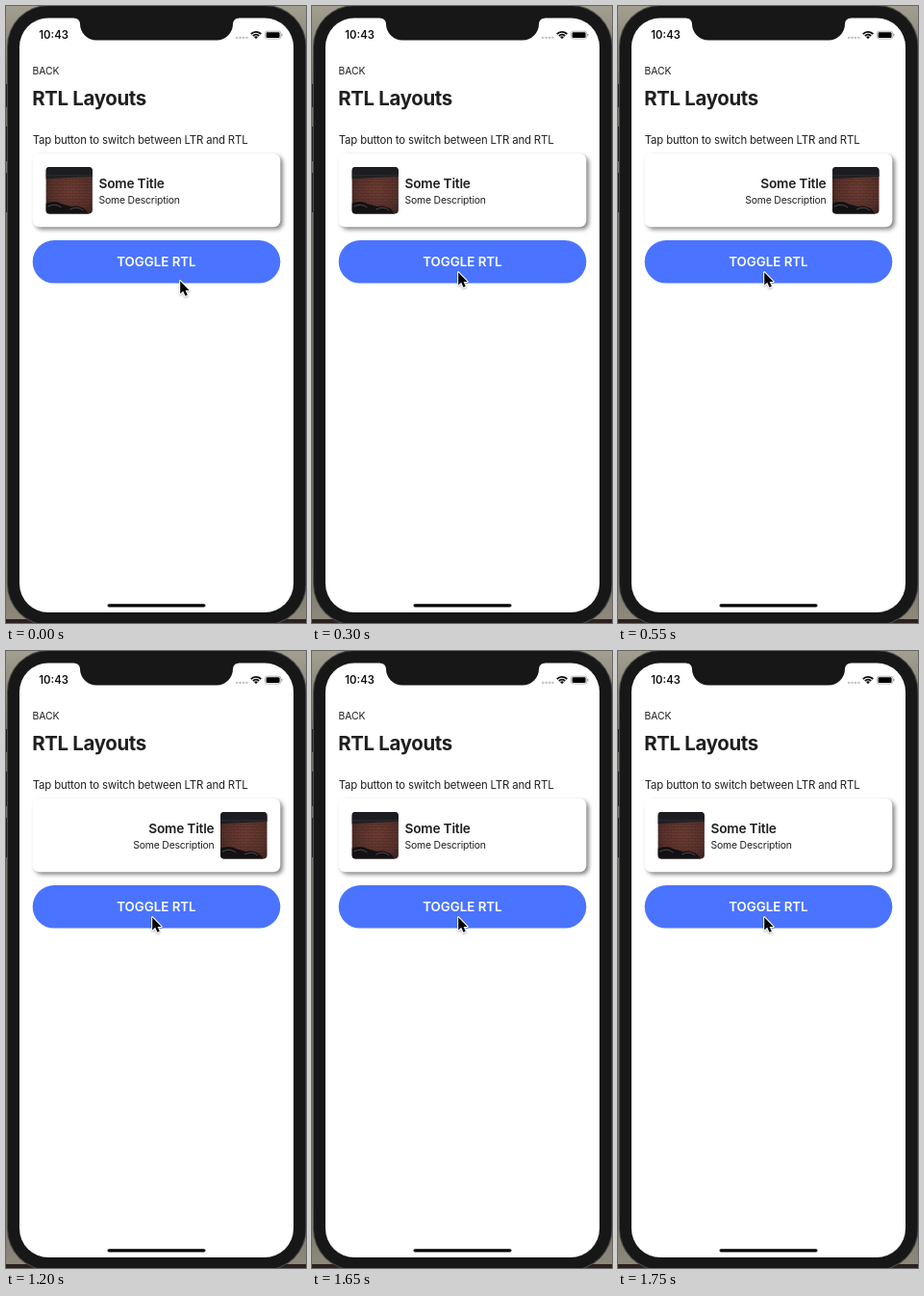
An HTML page with a canvas that plays this animation: 312x640 px, repeating every 1.9 s.

```html
<!DOCTYPE html>
<html lang="en">
<head>
<meta charset="utf-8">
<title>RTL Layouts</title>
<style>
html, body { margin: 0; width: 100%; height: 100%; overflow: hidden; background: #96917f; }
canvas { display: block; width: 312px; height: 640px; }
</style>
</head>
<body>
<canvas id="stage"></canvas>
<script>
const W = 312, H = 640, LOOP = 1900, STEP = 50;
const INK = '#1f1f21', BEZEL = '#171717';
const canvas = document.getElementById('stage');
const ctx = canvas.getContext('2d');
const dpr = window.devicePixelRatio || 1;
canvas.width = W * dpr;
canvas.height = H * dpr;

function box(x, y, w, h, r, fill) {
  ctx.beginPath();
  ctx.roundRect(x, y, w, h, r);
  ctx.fillStyle = fill;
  ctx.fill();
}

function shape(d, fill) {
  ctx.fillStyle = fill;
  ctx.fill(new Path2D(d));
}

function label(str, x, y, size, weight, spacing, align = 'left', fill = INK) {
  ctx.font = `${weight} ${size}px Inter, "Open Sans", sans-serif`;
  ctx.letterSpacing = spacing + 'px';
  ctx.textAlign = align;
  ctx.fillStyle = fill;
  ctx.fillText(str, x, y);
}

function device() {
  const bg = ctx.createLinearGradient(0, 0, 0, H);
  bg.addColorStop(0, '#a39f90');
  bg.addColorStop(0.12, '#77736a');
  bg.addColorStop(0.9, '#77736a');
  bg.addColorStop(1, '#8f8a7b');
  ctx.fillStyle = bg;
  ctx.fillRect(0, 0, W, H);
  box(0, 636, W, 4, 0, '#2b211f');
  for (const [y, h] of [[81, 24], [125, 36], [173, 41]]) box(0, y, 2, h, 0, '#222');
  // The body runs slightly past the stage on the right and at the bottom.
  box(1, -1, 311.5, 643.5, 43, '#4a4a4a');
  box(2, 0, 309.5, 641.5, 42, BEZEL);
  box(14, 12.5, 285, 616.5, 30, '#fff');
  shape('M71 12 V12.5 A6 6 0 0 1 77 18.5 A17 17 0 0 0 94 35.5 H219 A17 17 0 0 0 236 18.5 A6 6 0 0 1 242 12.5 V12 Z', BEZEL);
}

function statusBar() {
  label('10:43', 49.6, 34, 11.3, 600, 0, 'center', '#111');
  for (let i = 0; i < 4; i++) box(239 + i * 3.4, 31.7, 2.3, 2.2, 0.6, '#c4c4c4');
  ctx.strokeStyle = '#111';
  ctx.lineWidth = 1.8;
  for (const r of [4.3, 7.2]) {
    ctx.beginPath();
    ctx.arc(260, 34, r, -Math.PI * 0.76, -Math.PI * 0.24);
    ctx.stroke();
  }
  shape('M260 34.2 L258 32.1 Q260 30.5 262 32.1 Z', '#111');
  ctx.lineWidth = 0.7;
  ctx.strokeStyle = '#999';
  ctx.beginPath();
  ctx.roundRect(269.4, 26.2, 16.4, 7.8, 2.2);
  ctx.stroke();
  box(270.6, 27.3, 14, 5.6, 1.2, '#000');
  box(286.4, 28.8, 1, 2.6, 0.5, '#999');
}

function photo(x, y) {
  ctx.save();
  ctx.translate(x, y);
  ctx.beginPath();
  ctx.roundRect(0, 0, 48.5, 48.5, 4);
  ctx.clip();
  const wall = ctx.createRadialGradient(26, 24, 4, 26, 24, 34);
  wall.addColorStop(0, '#693a31');
  wall.addColorStop(0.6, '#56302a');
  wall.addColorStop(1, '#33201d');
  ctx.fillStyle = wall;
  ctx.fillRect(0, 0, 49, 49);
  ctx.fillStyle = 'rgba(28, 16, 15, 0.18)';
  for (let row = 0; row < 12; row++) {
    const top = 12 + row * 3;
    ctx.fillRect(0, top, 49, 0.7);
    for (let col = 0; col < 8; col++) ctx.fillRect(col * 7 + row % 2 * 3.5, top, 0.6, 3);
  }
  shape('M0 0 H49 V10 L0 12 Z', '#1b1d20');
  box(0, 8.5, 49, 0.8, 0, '#35353a');
  shape('M0 38 Q9 34 16 38 L26 41 Q35 39 41 44 L45 49 H0 Z', '#121113');
  ctx.strokeStyle = '#5e5657';
  ctx.lineWidth = 0.8;
  ctx.stroke(new Path2D('M2 41 Q10 37 16 42 M25 44 Q33 40 39 45'));
  ctx.restore();
}

function card(rtl) {
  ctx.save();
  ctx.shadowColor = 'rgba(0, 0, 0, 0.48)';
  ctx.shadowBlur = 4.5 * dpr;
  ctx.shadowOffsetX = ctx.shadowOffsetY = 2.6 * dpr;
  box(27.7, 153, 257.6, 76.2, 7, '#fff');
  ctx.restore();
  const x = rtl ? 216.5 : 96.5;
  const align = rtl ? 'right' : 'left';
  photo(rtl ? 223 : 41.4, 167);
  label('Some Title', x, 188.8, 13.7, 600, -0.2, align);
  label('Some Description', x, 205, 10.4, 400, -0.18, align);
}

function cursor(x, y) {
  ctx.save();
  ctx.translate(x, y);
  const arrow = new Path2D('M0 0 V13.2 L3 10.5 L5.3 15.6 L7.6 14.6 L5.4 9.7 H9.4 Z');
  ctx.shadowColor = 'rgba(0, 0, 0, 0.3)';
  ctx.shadowBlur = 2 * dpr;
  ctx.shadowOffsetY = dpr;
  ctx.strokeStyle = '#fff';
  ctx.lineWidth = 2.2;
  ctx.lineJoin = 'round';
  ctx.stroke(arrow);
  ctx.shadowColor = 'transparent';
  ctx.fillStyle = '#000';
  ctx.fill(arrow);
  ctx.restore();
}

function draw(t) {
  ctx.setTransform(dpr, 0, 0, dpr, 0, 0);
  device();
  statusBar();
  label('BACK', 27.5, 71.3, 10.4, 400, -0.1);
  label('RTL Layouts', 27.2, 103, 20.4, 700, -0.32);
  label('Tap button to switch between LTR and RTL', 27.7, 142.7, 11.4, 400, -0.16);
  card(t >= 500 && t < 1650);
  box(27.7, 243, 257.6, 44.6, 22.3, '#4a74ff');
  label('TOGGLE RTL', 156.4, 270, 13.3, 600, 0, 'center', '#fff');
  box(105.5, 620.2, 102, 3.3, 1.65, '#000');

  const p = Math.min(Math.floor(t / STEP) / 6, 1);
  const ease = p * p * (3 - 2 * p);
  cursor(181.2 - 29 * ease, 285.2 - 9 * ease);
}

const start = performance.now();
function tick() {
  draw((performance.now() - start) % LOOP);
  requestAnimationFrame(tick);
}
tick();
</script>
</body>
</html>
```
